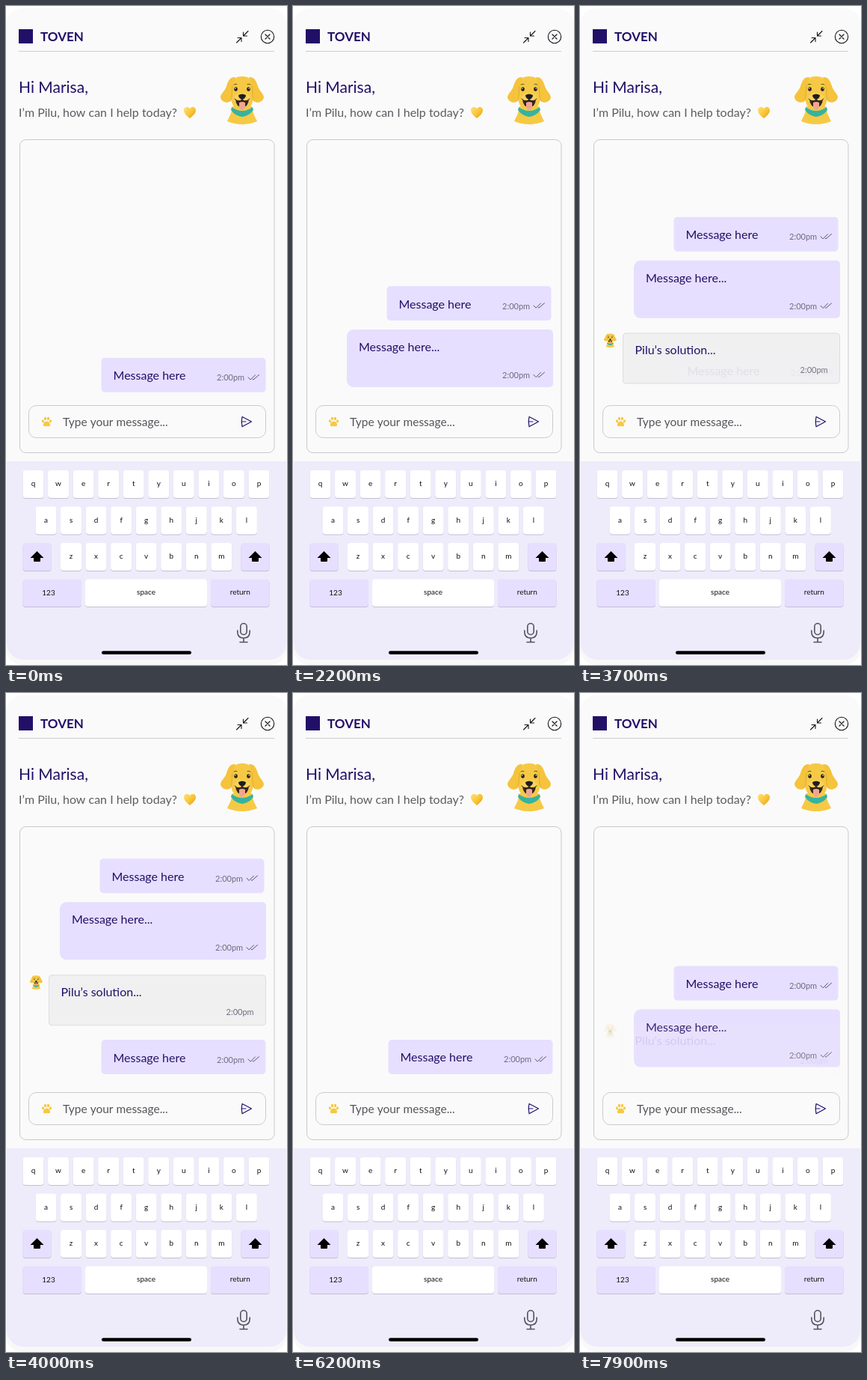
These frames come from a looping animation (376x880 px, 8 s). An HTML page with a canvas:

```html
<!DOCTYPE html>
<html lang="en">
<head>
<meta charset="utf-8">
<title>Chat assistant</title>
<style>
html, body { margin: 0; width: 100%; height: 100%; overflow: hidden; background: #fff; }
canvas { display: block; width: 376px; height: 880px; }
</style>
</head>
<body>
<canvas id="stage"></canvas>
<script>
const W = 376, H = 880, LOOP = 8000;
const NAVY = '#220f68', LILAC = '#e6dfff', GOLD = '#f6c945', GREY = '#5c5b60';
const FONT = 'Lato, "Open Sans", sans-serif';

const canvas = document.getElementById('stage');
const c = canvas.getContext('2d');
const dpr = window.devicePixelRatio || 1;
canvas.width = W * dpr;
canvas.height = H * dpr;

function box(x, y, w, h, r, fill, stroke) {
  c.beginPath();
  c.roundRect(x, y, w, h, r);
  if (fill) { c.fillStyle = fill; c.fill(); }
  if (stroke) { c.strokeStyle = stroke; c.lineWidth = 1; c.stroke(); }
}

function text(str, x, y, size, color, align = 'left', weight = 400) {
  c.font = `${weight} ${size}px ${FONT}`;
  c.fillStyle = color;
  c.textAlign = align;
  c.fillText(str, x, y);
}

function stroke(d, color, width) {
  c.strokeStyle = color;
  c.lineWidth = width;
  c.lineCap = c.lineJoin = 'round';
  c.stroke(new Path2D(d));
}

function shape(d, color) {
  c.fillStyle = color;
  c.fill(new Path2D(d));
}

function oval(x, y, rx, ry, color, turn = 0) {
  c.beginPath();
  c.ellipse(x, y, rx, ry, turn, 0, Math.PI * 2);
  c.fillStyle = color;
  c.fill();
}

// Puppy head, 58 x 64 units with its top centre at (29, 0)
function dog(x, y, scale) {
  c.save();
  c.translate(x, y);
  c.scale(scale, scale);
  shape('M16 40 C15 50 11 55 9 60 Q29 68 49 60 C47 55 43 50 42 40 Z', GOLD);
  shape('M15 41 Q29 51 43 41 L44 45 Q38 53 29 54 Q20 53 14 45 Z', '#36b39f');
  shape('M29 0 C40 0 43 6 43 16 C43 24 45 28 43 34 C41 42 35 45 29 45 C23 45 17 42 15 34 C13 28 15 24 15 16 C15 6 18 0 29 0 Z', GOLD);
  for (const side of [1, -1]) {
    c.save();
    c.translate(29, 0);
    c.scale(side, 1);
    shape('M-9 1 C-16 0 -19 6 -21 13 C-23 20 -29 23 -29 28 C-28 34 -21 36 -17 34 C-13 31 -14 20 -13 14 Z', '#f5c33c');
    stroke('M-13 13 C-14 21 -13 29 -16 33', '#dda72e', 0.9);
    oval(-8.5, 17, 2.3, 2.8, '#24201e');
    oval(-9.2, 16, 0.8, 0.8, '#fff');
    stroke('M-11 11 Q-9 9.5 -7 10.5', '#5b431d', 0.9);
    c.restore();
  }
  oval(29, 30, 11, 8, '#f9d25c');
  shape('M20 31 Q24 34 29 31 Q34 34 38 31 Q37 41 29 41 Q21 41 20 31 Z', '#3a2420');
  shape('M25 35 Q29 33 33 35 L33 40 Q32 45 29 45 Q26 45 25 40 Z', '#eea692');
  stroke('M29 27 L29 31 M19 30 Q24 35 29 31 Q34 35 39 30', '#2a2220', 1);
  shape('M24 25 Q29 22 34 25 Q34 29 29 31 Q24 29 24 25 Z', '#201d1e');
  c.restore();
}

function heart(x, y) {
  const g = c.createLinearGradient(x, y, x + 16, y + 15);
  g.addColorStop(0, '#ffe27a');
  g.addColorStop(0.55, '#f9c534');
  g.addColorStop(1, '#e3981f');
  c.save();
  c.translate(x, y);
  c.fillStyle = g;
  c.translate(-x, -y);
  c.beginPath();
  c.moveTo(x + 8, y + 15.5);
  c.bezierCurveTo(x + 4, y + 12, x, y + 9, x, y + 4.5);
  c.bezierCurveTo(x, y - 0.5, x + 6.5, y - 1.5, x + 8, y + 3);
  c.bezierCurveTo(x + 9.5, y - 1.5, x + 16, y - 0.5, x + 16, y + 4.5);
  c.bezierCurveTo(x + 16, y + 9, x + 12, y + 12, x + 8, y + 15.5);
  c.fill();
  c.restore();
}

function paw(x, y) {
  oval(x - 5, y - 0.5, 1.6, 2.1, GOLD, -0.4);
  oval(x - 2, y - 4, 1.7, 2.3, GOLD);
  oval(x + 2, y - 4, 1.7, 2.3, GOLD);
  oval(x + 5, y - 0.5, 1.6, 2.1, GOLD, 0.4);
  c.save();
  c.translate(x, y);
  shape('M0 -0.5 C3 -0.5 5 3 4.5 5 C4 7 2 6 0 6 C-2 6 -4 7 -4.5 5 C-5 3 -3 -0.5 0 -0.5 Z', GOLD);
  c.restore();
}

function header() {
  box(17, 31, 19, 19, 0, NAVY);
  text('TOVEN', 46, 47, 17, NAVY, 'left', 700);
  stroke('M324 33.5 L317.5 40 M317.5 35 V40 H322.5 M308.5 49 L315 42.5 M310 42.5 H315 V47.5', '#17151c', 1.1);
  c.beginPath();
  c.arc(350, 41, 8.7, 0, Math.PI * 2);
  c.lineWidth = 1.1;
  c.stroke();
  stroke('M347 38 L353 44 M353 38 L347 44', '#17151c', 1.2);
  c.fillStyle = '#cdcdcf';
  c.fillRect(17, 60, 342, 1);
  text('Hi Marisa,', 17, 116, 21, NAVY);
  text('I’m Pilu, how can I help today?', 17, 148, 16, GREY);
  heart(238, 134.5);
  dog(287, 94, 1);
}

function inputBar() {
  box(30.5, 533.5, 317, 43, 10, null, '#cbcbce');
  paw(54.5, 555);
  text('Type your message...', 76, 561, 15.5, '#55545a');
  stroke('M316 548.5 L328.5 555 L316 561.8 L315.2 555 Z M315.5 555 H321', NAVY, 1.2);
}

function key(x, y, w, h, label, fill = '#fff') {
  box(x, y + 1, w, h, 4, '#c3bfd3');
  box(x, y, w, h, 4, fill);
  if (label) text(label, x + w / 2, y + h / 2 + 2.5, 10, '#111', 'center');
}

function shiftKey(x) {
  key(x, 717, 38, 37, '', LILAC);
  c.save();
  c.translate(x + 19, 735);
  shape('M0 -7 L9 2 H4.5 V6 Q4.5 7 3.5 7 H-3.5 Q-4.5 7 -4.5 6 V2 H-9 Z', '#000');
  c.restore();
}

function keyboard() {
  box(1, 608, 374, 265, [0, 0, 22, 22], '#eeebfb');
  const rows = [['qwertyuiop', 22.5, 620], ['asdfghjkl', 39.5, 668.5], ['zxcvbnm', 73, 717]];
  for (const [letters, x, y] of rows) {
    [...letters].forEach((ch, i) => key(x + i * 33.55, y, 28, 37, ch));
  }
  shiftKey(22.5);
  shiftKey(314.5);
  key(22.5, 765.5, 78.5, 36.5, '', LILAC);
  key(106, 765.5, 163, 36.5, 'space');
  key(274, 765.5, 78.5, 36.5, 'return', LILAC);
  text('123', 57, 787, 10, '#111', 'center');
  box(313.8, 824.5, 8.4, 15, 4.2);
  c.strokeStyle = '#55525f';
  c.lineWidth = 1.6;
  c.stroke();
  stroke('M309.8 834 V836 Q310 844 318 844 Q326 844 326.2 836 V834 M318 844 V849.5 M313 849.5 H323', '#55525f', 1.6);
  box(128, 861.2, 120, 4.6, 2.3, '#000');
}

function stamp(x, y, ticks) {
  text('2:00pm', x, y, 11, '#716b82');
  if (!ticks) return;
  c.save();
  c.translate(x + 42, y);
  stroke('M0 -4.5 L3.2 -1.3 L9.5 -7.6 M6.2 -2 L7 -1.3 L14.5 -7.8', '#5a5470', 1);
  c.restore();
}

function shortMsg(x, y) {
  box(x, y, 220, 46, 5, LILAC);
  text('Message here', x + 16, y + 29.5, 16, NAVY);
  stamp(x + 154.5, y + 30.5, true);
}

function longMsg(x, y) {
  box(x, y, 276, 77, [9, 5, 5, 9], LILAC);
  text('Message here...', x + 16, y + 29, 16, NAVY);
  stamp(x + 208, y + 65, true);
}

function reply(x, y) {
  dog(x - 25.5, y + 1, 0.29);
  box(x, y + 0.5, 290, 67, 4, '#f0f0f0', '#dddde0');
  text('Pilu’s solution...', x + 16, y + 29, 16, NAVY);
  stamp(x + 237, y + 53.5, false);
}

// Each state: [x, y] of the four parts, or null when hidden
const parts = [shortMsg, longMsg, reply, shortMsg];
const states = [
  [[127.5, 463], null, null, null],
  [[125.5, 374], [72, 432], null, null],
  [[125.5, 286.3], [72, 344.3], [57.5, 441], null],
  [[125.5, 220], [72, 278], [57.5, 375], [127.5, 463]]
];
const starts = [-486, 903, 2292, 3660, 5070, 6459, 7848];

// Under-damped spring: stiffness 100, damping 15, mass 1
function spring(ms) {
  const s = ms / 1000, k = 7.5, w = Math.sqrt(100 - k * k);
  return 1 - Math.exp(-k * s) * (Math.cos(w * s) + k / w * Math.sin(w * s));
}

function chat(t) {
  let i = starts.length - 1;
  while (starts[i] > t) i--;
  const from = states[(i + 3) % 4], to = states[i % 4];
  const p = spring(t - starts[i]);
  const fade = Math.min(1, Math.max(0, p));
  parts.forEach((draw, n) => {
    const a = from[n] || to[n], b = to[n] || a;
    if (!a) return;
    c.globalAlpha = !from[n] ? fade : !to[n] ? 1 - fade : 1;
    if (c.globalAlpha > 0.002) draw(a[0] + (b[0] - a[0]) * p, a[1] + (b[1] - a[1]) * p);
  });
  c.globalAlpha = 1;
}

function frame(now) {
  c.setTransform(dpr, 0, 0, dpr, 0, 0);
  c.fillStyle = '#fff';
  c.fillRect(0, 0, W, H);
  box(0, 6, W, 874, 22, '#f8f8f8');
  box(0, 3, W, 870, 22, '#fafafa');
  header();
  box(18.5, 178.5, 340.5, 418, 8, null, '#c9c9cc');
  chat(now % LOOP);
  inputBar();
  keyboard();
  requestAnimationFrame(frame);
}
requestAnimationFrame(frame);
</script>
</body>
</html>
```
